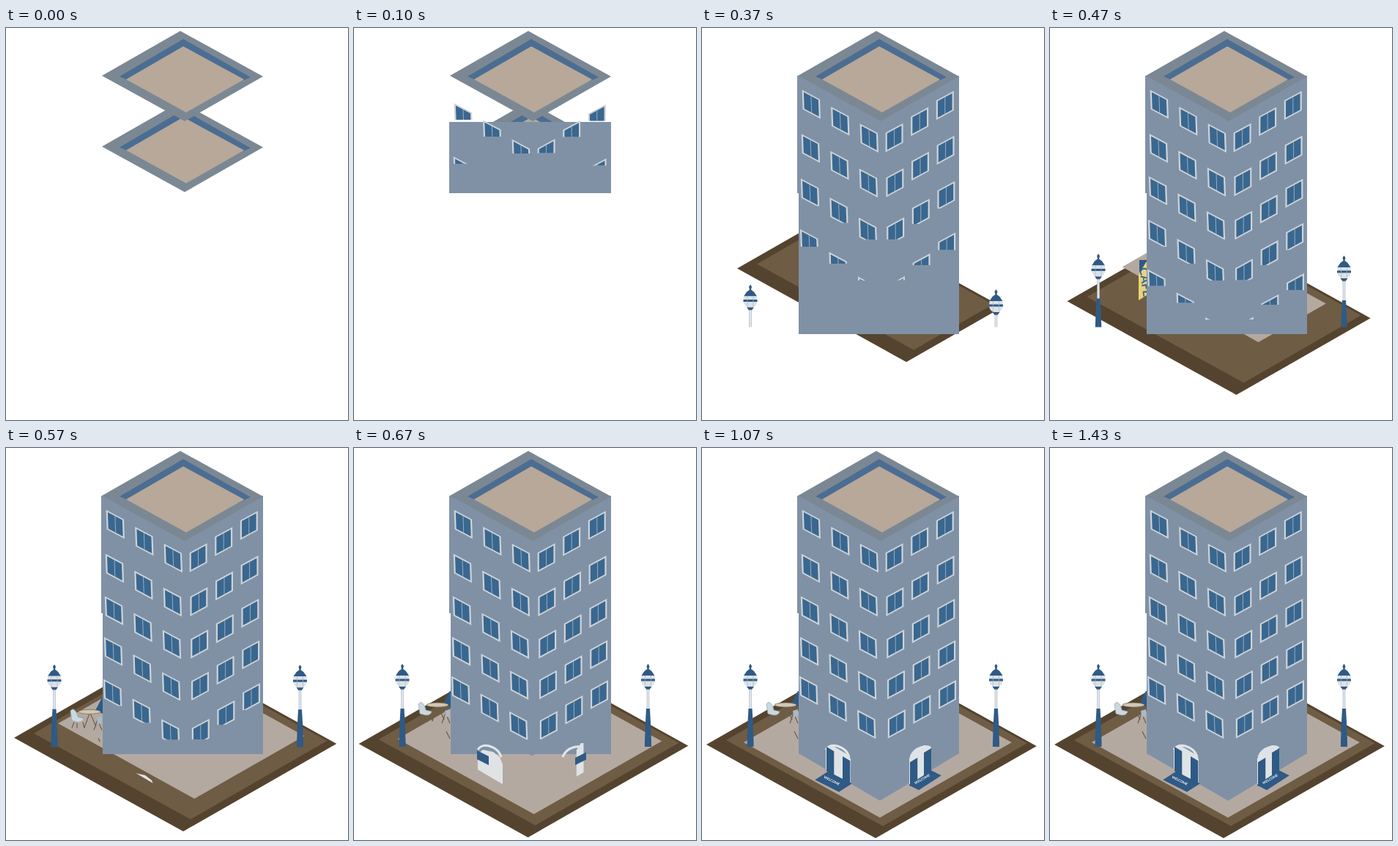
An HTML page that plays this animation: 467 px wide and 534 px high, repeating every 5010 ms.

```html
<!DOCTYPE html>
<html lang="en">
<head>
<meta charset="utf-8">
<title>Building assembly</title>
<style>
html, body { margin: 0; width: 100%; height: 100%; overflow: hidden; background: #fff; }
svg { display: block; width: 467px; height: 534px; }
.wall { fill: #8091a6; }
.rim { fill: #7b8894; }
.navy { fill: #2f5a85; }
.roofIn { fill: #4c6d92; }
.roofTop { fill: #b7a899; }
.soil { fill: #54442f; }
.earth { fill: #6f5c44; }
.paving { fill: #b4a9a1; }
.door { fill: #dfe3e6; }
.frame { fill: #cdd3d8; }
.pane { fill: #3a678f; }
.sign { fill: #ecd27c; }
.arch { fill: none; stroke: #e3e7ea; stroke-width: 3; }
text { font-family: Lato, "Open Sans", sans-serif; font-weight: 700; }
</style>
</head>
<body>
<svg id="stage" viewBox="0 0 467 534">
  <defs>
    <g id="lamp">
      <path class="navy" d="M0 294l2 3-1 4 4 3 4 6h-18l4-6 4-3-1-4z"/>
      <path fill="#dce2e7" d="M-9 310h18l.5 7q-1 6-6 8h-7q-5-2-6-8z"/>
      <path class="navy" d="M-9.500 314.500h19v3h-19zM-5 325h10l-3 4h-4z"/>
      <path fill="none" stroke="#a9b6c2" stroke-width=".7" d="M-4 310v15M4 310v15"/>
      <path fill="#dfe4e8" stroke="#a9b4be" stroke-width=".6" d="M-1.500 329h3v27h-3z"/>
      <path class="navy" d="M-2.500 355h5l1 18 1 28v6h-9v-6l1-28z"/>
    </g>
    <g id="cafe">
      <path class="navy" d="M122 348l9-17 9 1v24z"/>
      <path fill="none" stroke="#6e5b48" stroke-width="1.200" d="M93 364l-3 8M105 364l2 8M97 365v7M114 352l-7 20M115 352l8 18M120 375l5-14 6 14M126 386l5 10"/>
      <path fill="#cbd8e0" stroke="#92a6b6" stroke-width=".7" d="M88 349q2-4 5-2 4 3 5 10l8 2q-1 5-8 5l-8-2z"/>
      <ellipse cx="114" cy="350" rx="15" ry="3" fill="#cfc8b6" stroke="#77664f" stroke-width=".7"/>
      <path fill="#a9b9c6" d="M124 358l7-2v9l-6 2z"/>
    </g>
  </defs>
</svg>
<script>
const LOOP = 5010, NS = 'http://www.w3.org/2000/svg';
const stage = document.getElementById('stage');
const parts = [];
let clips = 0;

function add(parent, tag, attrs, inner = '') {
  const el = document.createElementNS(NS, tag);
  for (const k in attrs) el.setAttribute(k, attrs[k]);
  el.innerHTML = inner;
  parent.appendChild(el);
  return el;
}
const still = inner => add(stage, 'g', {}, inner);
const poly = (cls, pts) => `<polygon class="${cls}" points="${pts}"/>`;

// Upright parallelogram from its top left corner
const slab = (x, y, w, h, slope = 0) =>
  `${x},${y} ${x + w},${y + w * slope} ${x + w},${y + h + w * slope} ${x},${y + h}`;

// Rhomboid from its left, right and bottom corners
const rhomb = ([lx, ly], [rx, ry], [bx, by]) =>
  `${lx},${ly} ${lx + rx - bx},${ly + ry - by} ${rx},${ry} ${bx},${by}`;

// Slides art from (dx, dy) into place, seen only inside the fixed polygon
function peek(inner, clip, start, dur, dx, dy) {
  const id = 'c' + clips++;
  add(stage, 'clipPath', { id }, `<polygon points="${clip}"/>`);
  const outer = add(stage, 'g', { 'clip-path': `url(#${id})` });
  const el = add(outer, 'g', {}, inner);
  parts.push({ el, start, dur, dx, dy });
}
const rise = (cls, x, y, w, h, start, dur) =>
  peek(poly(cls, slab(x, y, w, h)), slab(x, y, w, h), start, dur, 0, h);

// A ground layer slides out from under its own upper right edge
function ground(cls, l, r, b, start, dur, dist) {
  const slope = (b[1] - l[1]) / (b[0] - l[0]);
  const edge = x => r[1] + (x - r[0]) * slope;
  peek(poly(cls, rhomb(l, r, b)), `-40,${edge(-40)} 467,${edge(467)} 467,534 -40,534`,
    start, dur, dist * 0.55, -dist);
}
ground('soil', [6, 404], [457, 406], [237, 531.5], 230, 535, 190);
ground('earth', [33, 398], [444, 402], [247, 515], 230, 535, 190);
ground('paving', [57, 401], [423, 401], [243, 503.5], 382, 420, 153);

// Café corner
const sign = still(poly('navy', slab(122, 316, 24, 16)) +
  poly('sign', '121,336 131,319 146,319 146,355 121,371') +
  '<text font-size="16" fill="#3a678f" transform="translate(122 327) rotate(82)">CAFE</text>');
peek('<use href="#cafe"/>', slab(80, 325, 60, 75), 475, 190, 0, 75);

for (const [x, start] of [[66, 298], [401.5, 308]])
  peek(`<use href="#lamp" x="${x}"/>`, slab(x - 14, 292, 28, 115.5), start, 337, 0, 114);

// Walls and roofs
const roof = dy => still(`<g transform="translate(0 ${dy})">` +
  poly('rim', '131,65 238,4 351,66 244,127') +
  poly('roofIn', '155,66 242,15 334,67 325,71 164,70') +
  poly('roofTop', '164,70 242,25 325,70 246,115') + '</g>');

roof(96.5);
rise('wall', 132, 163, 219, 254, 104, 300);
peek(poly('wall', '132,416 351,416 243,480.500'), slab(130, 417, 223, 66), 665, 326, 0, -64);
rise('wall', 130, 65, 221, 160, 20, 300);
roof(0);

// Windows: rows close up slightly downward, outer pairs come first
function windowAt(x, y, slope, start) {
  const pane = (cls, w, h) => poly(cls, slab(x - w / 2, y - h / 2 - w / 2 * slope, w, h, slope));
  const lean = slope > 0 ? 2 : 0;
  const art = `<g transform="translate(${x} 0) translate(0 ${y}) skewX(${lean}) translate(${-x} ${-y})">` +
    pane('frame', 24, 26.6) + pane('pane', 19.6, 22.4) +
    `<path d="M${x} ${y - 11}v22" stroke="#9fb6ca" stroke-width=".9"/></g>`;
  peek(art, slab(x - 14, y - 21, 28, 42), start, 337, 0, 41);
}
for (let r = 0; r < 5; r++) {
  const drop = 61 * r - 1.1 * r * r;
  for (let i = 0; i < 3; i++) {
    const start = Math.max(20, 35.5 * (3 * r + i) - 37), j = 2 - i;
    windowAt(149.3 + 39.5 * i - 0.9 * r, 104 + 23 * i + drop, 0.54, start);
    windowAt(262.6 + 34.6 * j + 0.8 * r, 149.5 - (22 - 0.5 * r) * j + drop, -0.54, start);
  }
}

// Doors: arch, panel, then the shutters
const arches = still('<path class="arch" d="M169 411q5-8 16-5 13 4 16 15M285 421q4-10 14-13 10-3 13 1"/>');
peek(poly('door', '169,438 169,410 176,404 190,407 199,414 203,424 203,458'),
  slab(169, 400, 34, 38, 0.59), 540, 260, 0, 56);
peek(poly('door', '283,459 283,423 290,412 303,405 311,406 313.500,411 313.500,441'),
  slab(283, 402, 30.5, 60), 620, 300, 36, -20);

const shutter = (x, y, slope) =>
  peek(poly('navy', slab(x, y, 10.5, 33, slope)), slab(x, y - 8, 10.5, 54), 720, 340, 0, -52);
for (const k of [0, 1]) {
  shutter(170 + 22 * k, 407 + 13 * k, 0.6);
  shutter(284 + 19 * k, 428 - 13 * k, -0.6);
}
const boards = still(poly('navy', slab(168, 412, 16, 12, 0.5)) + poly('navy', slab(302, 422, 15, 10, -0.5)));

// Mats slide out from the doors
function mat(l, r, b, turn, dx) {
  const x = (l[0] + r[0]) / 2 - 3, y = (l[1] + r[1]) / 2;
  const art = poly('navy', rhomb(l, r, b)) +
    `<text font-size="4.600" fill="#fff" text-anchor="middle" transform="translate(${x} ${y}) rotate(${turn})">WELCOME</text>`;
  const top = [l[0] + r[0] - b[0], l[1] + r[1] - b[1]];
  const edge = turn > 0 ? `${top} ${r}` : `${l} ${top}`;
  const rest = turn > 0 ? `${r[0]},475 ${l[0]},475 ${l}` : `${r} ${r[0]},475 ${l[0]},475`;
  peek(art, `${edge} ${rest}`, 890, 180, dx, -28);
}
mat([154, 452], [205, 457], [187, 468.5], 27, 6);
mat([282, 459], [327, 446], [296, 466], -30, -6);

const clamp = v => Math.min(1, Math.max(0, v));
const show = (el, on) => el.setAttribute('visibility', on ? 'visible' : 'hidden');
const move = (el, x, y) => el.setAttribute('transform', `translate(${x} ${y})`);

function draw(t) {
  for (const p of parts) {
    const u = clamp((t - p.start) / p.dur), left = (1 - u) ** 3;
    show(p.el, u > 0);
    move(p.el, p.dx * left, p.dy * left);
  }
  show(sign, t > 425 && t < 570);
  move(sign, 16 * clamp((t - 470) / 90), 0);
  show(arches, t > 600);
  show(boards, t > 620 && t < 950);
  const drop = clamp((t - 670) / 200);
  move(boards, drop, 14 * drop);
}

let t0;
function tick(now) {
  t0 ??= now;
  draw((now - t0) % LOOP);
  requestAnimationFrame(tick);
}
draw(0);
requestAnimationFrame(tick);
</script>
</body>
</html>
```
